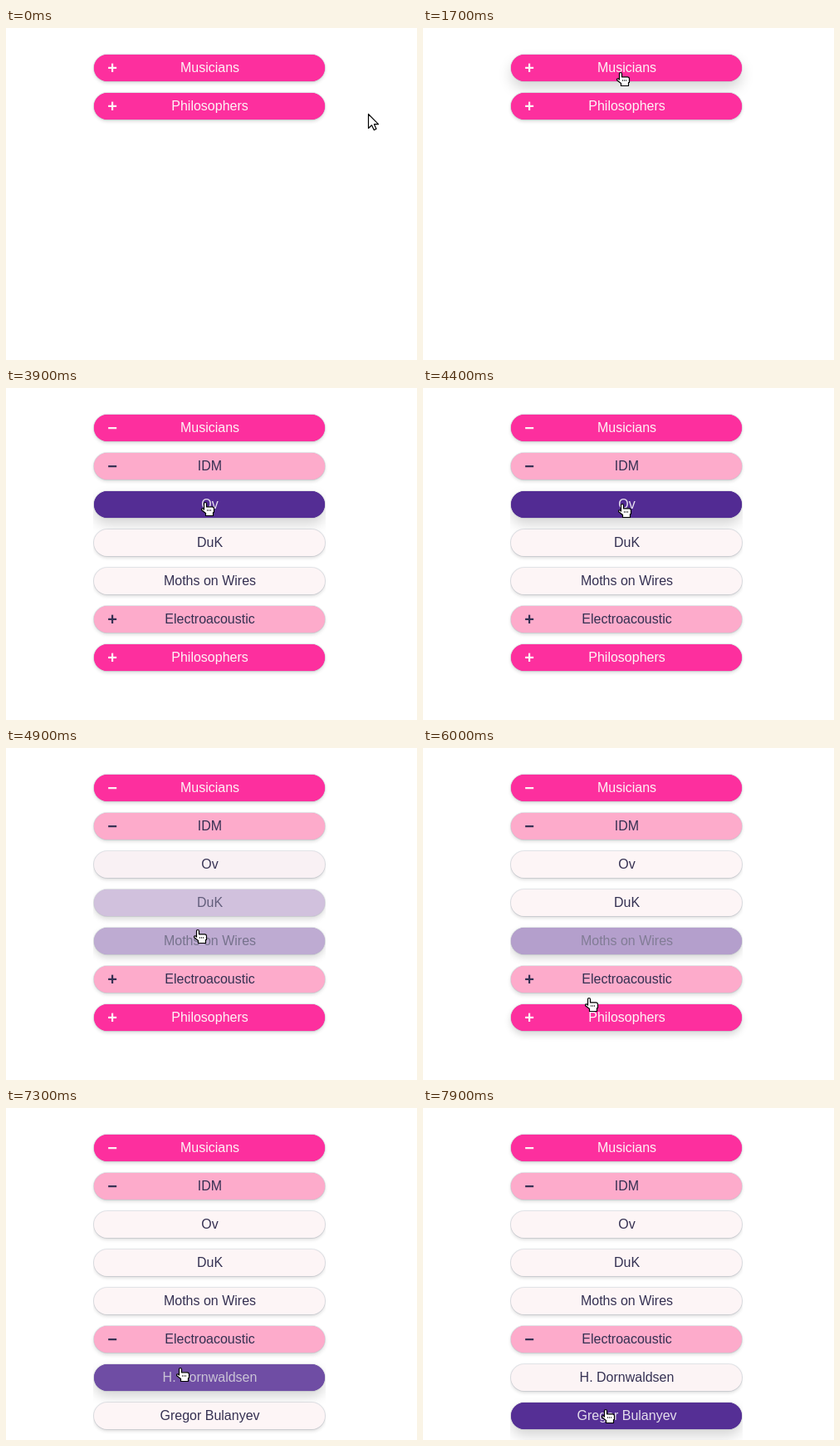
An HTML page with a canvas for the animation above (8 s loop, 495 by 399 pixels).

```html
<!DOCTYPE html>
<html lang="en">
<head>
<meta charset="utf-8">
<title>Nested accordion</title>
<style>
  html, body { margin: 0; width: 100%; height: 100%; overflow: hidden; background: #fff; }
  canvas { display: block; }
</style>
</head>
<body>
<canvas id="stage" width="495" height="399"></canvas>
<script>
const ctx = document.getElementById('stage').getContext('2d');
const LOOP = 8000, FADE = 500, EXPAND = 90, TICK = 5;
const LEFT = 106, TOP = 32, WIDTH = 278, HEIGHT = 32, STEP = 46;
const FONT = '"Liberation Sans", Arial, sans-serif';

const HOT = [253, 47, 158], PINK = [253, 171, 203], PALE = [253, 245, 246];
const PURPLE = [82, 43, 147], DARK = [52, 48, 82], LIGHT = [232, 226, 240];

const branch = (label, fill, ink, clickAt, parent) =>
  ({ label, fill, ink, hoverFill: fill, hoverInk: ink, clickAt, parent, visits: [] });
const leaf = (label, parent) =>
  ({ label, fill: PALE, ink: DARK, hoverFill: PURPLE, hoverInk: LIGHT, parent, isLeaf: true, visits: [] });

const musicians = branch('Musicians', HOT, PALE, 1940);
const idm = branch('IDM', PINK, DARK, 2950, musicians);
const electro = branch('Electroacoustic', PINK, DARK, 6550, musicians);
const rows = [
  musicians,
  idm, leaf('Ov', idm), leaf('DuK', idm), leaf('Moths on Wires', idm),
  electro, leaf('H. Dornwaldsen', electro), leaf('Gregor Bulanyev', electro), leaf('', electro),
  branch('Philosophers', HOT, PALE, Infinity)
];

// Pointer moves; it rests between them
const home = { x: 436, y: 103 };
const moves = [
  { from: 200, to: 600, x: 330, y: 157 },
  { from: 600, to: 1000, x: 262, y: 94 },
  { from: 1050, to: 1350, x: 238, y: 57 },
  { from: 2300, to: 2600, x: 243, y: 97 },
  { from: 3350, to: 3550, x: 240, y: 141 },
  { from: 4350, to: 4870, x: 231, y: 222 },
  { from: 5790, to: 5910, x: 206, y: 320 },
  { from: 5910, to: 6110, x: 192, y: 284 },
  { from: 6900, to: 7100, x: 210, y: 316 },
  { from: 7350, to: 7550, x: 220, y: 366 }
];

const arrow = new Path2D('M.5 .5V17.5L4.5 13.8L7.2 19.6L10 18.3L7.4 12.7H12.5Z');
const hand = new Path2D('M3.5 9V2.2Q3.5 .5 5 .5T6.5 2.2V5.8H13.5Q15.5 6 15.5 8V12.5H14.5V16.5H5.5V13.5L.7 9.8Q0 7.5 2.2 7.9Z');
const knuckles = new Path2D('M7.5 9V11M9.5 9V11M11.5 9V11');

const clamp = v => Math.max(0, Math.min(1, v));
const mix = (a, b, k) => a + (b - a) * k;
const mixColor = (a, b, k) => `rgb(${a.map((v, i) => Math.round(mix(v, b[i], k)))})`;
const smooth = u => u * u * (3 - 2 * u);

// CSS "ease" curve, cubic-bezier(.25, .1, .25, 1)
function ease(x) {
  if (x <= 0) return 0;
  if (x >= 1) return 1;
  let lo = 0, hi = 1;
  for (let i = 0; i < 18; i++) {
    const s = (lo + hi) / 2;
    if (.75 * s * (1 - s) + s ** 3 < x) lo = s; else hi = s;
  }
  return .3 * lo * (1 - lo) ** 2 + 3 * lo * lo * (1 - lo) + lo ** 3;
}

function pointerAt(t) {
  let { x, y } = home;
  for (const move of moves) {
    const k = smooth(clamp((t - move.from) / (move.to - move.from)));
    x = mix(x, move.x, k);
    y = mix(y, move.y, k);
  }
  return { x, y };
}

const openness = (row, t) => ease((t - row.clickAt) / EXPAND);

// Visible rows with their place at time t
function layout(t) {
  let y = TOP - STEP;
  return rows.map(row => {
    const shown = row.parent ? openness(row.parent, t) : 1;
    y += STEP * shown;
    return { row, y, shown };
  }).filter(place => place.shown > 0);
}

// Follow the pointer once through the loop to learn when it is over each row
let firstHover = LOOP;
for (let t = 0, current; t < LOOP; t += TICK) {
  const { x, y } = pointerAt(t);
  const place = layout(t).find(p => y >= p.y && y < p.y + HEIGHT);
  const over = place && x > LEFT && x < LEFT + WIDTH ? place.row : undefined;
  if (over === current) continue;
  if (current) current.visits.at(-1).leave = t;
  if (over) {
    over.visits.push({ enter: t, leave: Infinity });
    firstHover = Math.min(firstHover, t);
  }
  current = over;
}

const hoverLevel = (row, t) => clamp(row.visits.reduce(
  (sum, { enter, leave }) => sum + ease((t - enter) / FADE) - ease((t - leave) / FADE), 0));

function pill(y, grow, fill) {
  ctx.fillStyle = fill;
  ctx.beginPath();
  ctx.roundRect(LEFT - grow, y - grow, WIDTH + 2 * grow, HEIGHT + 2 * grow, HEIGHT / 2 + grow);
  ctx.fill();
}

function shadow(offset, blur, alpha) {
  ctx.shadowOffsetY = offset;
  ctx.shadowBlur = blur;
  ctx.shadowColor = `rgba(0,0,0,${alpha})`;
}

function text(string, font, x, y) {
  ctx.font = `${font} ${FONT}`;
  ctx.fillText(string, x, y);
}

function drawRow({ row, y, shown }, t) {
  const level = hoverLevel(row, t);
  const fill = mixColor(row.fill, row.hoverFill, level);
  ctx.save();
  ctx.globalAlpha = shown;
  if (row.isLeaf) {
    ctx.beginPath();
    ctx.rect(LEFT - 1, 0, WIDTH + 2, 399);
    ctx.clip();
  }
  shadow(mix(2, 8, level), mix(4, 16, level), mix(.16, .17, level));
  pill(y, 0, fill);
  shadow(0, 0, 0);
  pill(y, 1, 'rgba(60,70,100,.13)');
  pill(y, 0, fill);
  ctx.fillStyle = mixColor(row.ink, row.hoverInk, level);
  text(row.label, '16px', 245.5, y + 21);
  if (!row.isLeaf) text(openness(row, t) > 0 ? '\u2212' : '+', 'bold 20px', 128, y + 23);
  ctx.restore();
}

function drawPointer(t) {
  const { x, y } = pointerAt(t);
  const isHand = t >= firstHover;
  const shape = isHand ? hand : arrow;
  ctx.save();
  ctx.translate(Math.round(x) - (isHand ? 5 : 0), Math.round(y) - (isHand ? 4 : 0));
  ctx.fillStyle = '#fff';
  ctx.strokeStyle = '#000';
  ctx.lineWidth = 1.2;
  ctx.lineJoin = 'round';
  ctx.fill(shape);
  ctx.stroke(shape);
  if (isHand) {
    ctx.lineWidth = .7;
    ctx.stroke(knuckles);
  }
  ctx.restore();
}

function draw(t) {
  ctx.fillStyle = '#fff';
  ctx.fillRect(0, 0, 495, 399);
  ctx.textAlign = 'center';
  for (const place of layout(t)) drawRow(place, t);
  drawPointer(t);
}

const start = performance.now();
function frame() {
  draw((performance.now() - start) % LOOP);
  requestAnimationFrame(frame);
}
frame();
</script>
</body>
</html>
```
